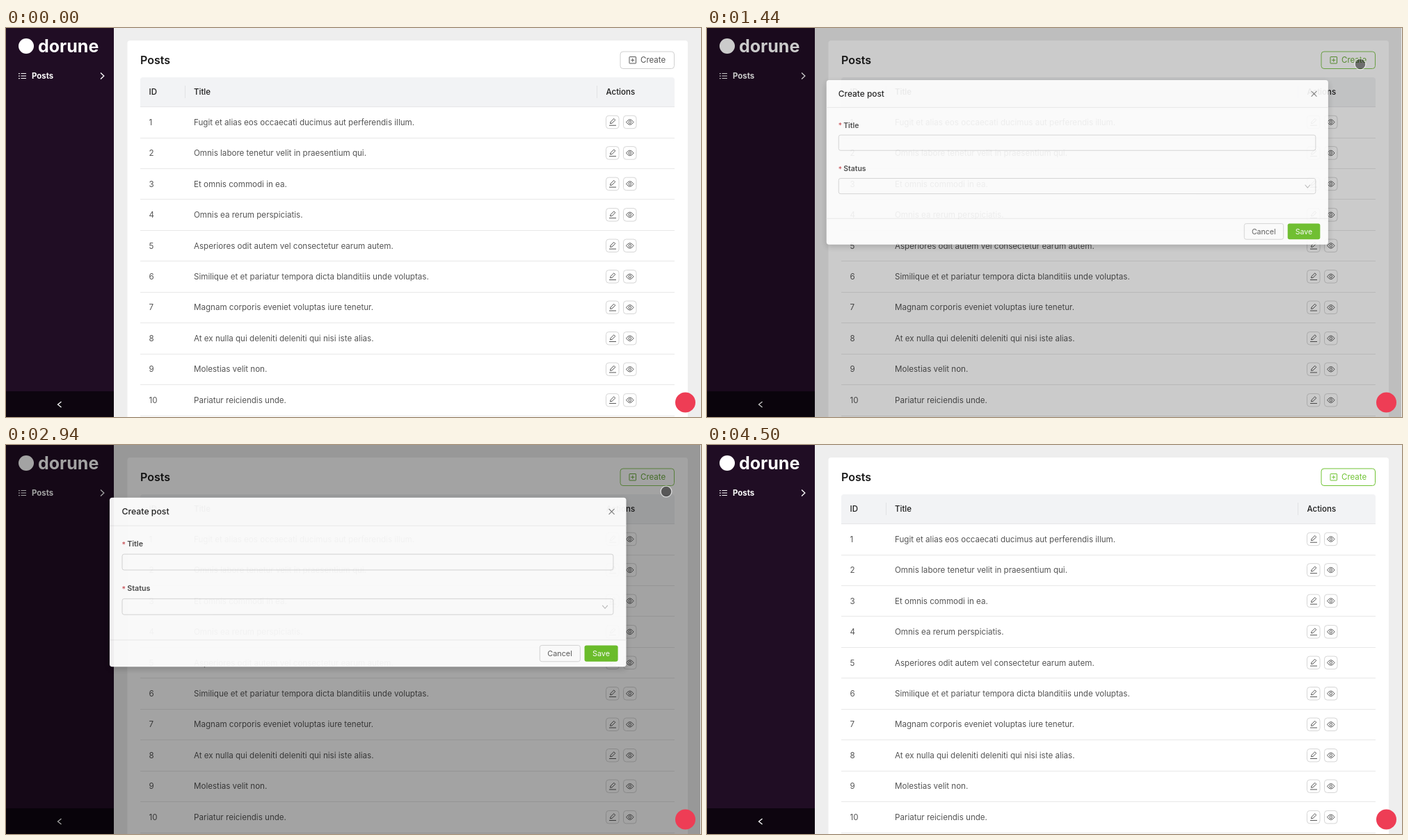
Recreate the animation shown at these times as an HTML page with a canvas. Size 999 by 560 pixels, loop 4.74 s.

```html
<!DOCTYPE html>
<html lang="en">
<head>
<meta charset="utf-8">
<title>Posts</title>
<style>
  html, body { margin: 0; width: 100%; height: 100%; overflow: hidden; background: #eee; }
  canvas { display: block; }
</style>
</head>
<body>
<canvas id="stage" width="999" height="560"></canvas>
<script>
const W = 999, H = 560, LOOP = 4740, STEP = 60;
const GREEN = '#67be23';
const stage = document.getElementById('stage').getContext('2d');
const layer = document.createElement('canvas');
layer.width = W;
layer.height = H;
const layerCtx = layer.getContext('2d');
let ctx = stage;

const POSTS = [
  'Fugit et alias eos occaecati ducimus aut perferendis illum.',
  'Omnis labore tenetur velit in praesentium qui.',
  'Et omnis commodi in ea.',
  'Omnis ea rerum perspiciatis.',
  'Asperiores odit autem vel consectetur earum autem.',
  'Similique et et pariatur tempora dicta blanditiis unde voluptas.',
  'Magnam corporis eveniet voluptas iure tenetur.',
  'At ex nulla qui deleniti deleniti qui nisi iste alias.',
  'Molestias velit non.',
  'Pariatur reiciendis unde.'
];

// Pointer path: time, x, y
const PATH = [
  [600, 955, 80], [780, 948, 62], [1080, 939, 52], [1680, 939, 52],
  [2220, 944, 62], [2700, 949, 67], [2940, 949, 67], [3000, 950, 67],
  [3120, 974, 67], [3240, 1010, 67]
];

const clamp = v => Math.max(0, Math.min(1, v));
const ramp = (t, start, length) => clamp((t - start) / length);
const mix = (a, b, k) => a + (b - a) * k;
const mixRgb = (a, b, k) => `rgb(${a.map((v, i) => Math.round(mix(v, b[i], k))).join(',')})`;

function bezier(x1, y1, x2, y2) {
  const at = (s, a, b) => 3 * (1 - s) ** 2 * s * a + 3 * (1 - s) * s * s * b + s ** 3;
  return x => {
    let lo = 0, hi = 1;
    for (let i = 0; i < 24; i++) {
      const mid = (lo + hi) / 2;
      if (at(mid, x1, x2) < x) lo = mid; else hi = mid;
    }
    return at(lo, y1, y2);
  };
}
const easeOpen = bezier(.08, .82, .17, 1);
const easeClose = bezier(.78, .14, .15, .86);

function text(str, x, y, size, color, weight = 400) {
  ctx.font = `${weight} ${size}px Inter, sans-serif`;
  ctx.fillStyle = color;
  ctx.fillText(str, x, y + size * .36);
}

function box(x, y, w, h, r, fill, stroke) {
  ctx.beginPath();
  ctx.roundRect(x, y, w, h, r);
  if (fill) { ctx.fillStyle = fill; ctx.fill(); }
  if (stroke) { ctx.strokeStyle = stroke; ctx.lineWidth = 1; ctx.stroke(); }
}

function rect(x, y, w, h, color) {
  ctx.fillStyle = color;
  ctx.fillRect(x, y, w, h);
}

function disc(x, y, r, color) {
  ctx.beginPath();
  ctx.arc(x, y, r, 0, Math.PI * 2);
  ctx.fillStyle = color;
  ctx.fill();
}

function line(points, color, width = 1, close = false) {
  ctx.beginPath();
  points.forEach(([x, y]) => ctx.lineTo(x, y));
  if (close) ctx.closePath();
  ctx.strokeStyle = color;
  ctx.lineWidth = width;
  ctx.stroke();
}

function pencil(x, y, color) {
  line([[x - 3.5, y + 2], [x - 3, y - .3], [x + 1.8, y - 5], [x + 3.8, y - 3], [x - 1, y + 1.6]], color, 1, true);
  line([[x - 5, y + 4.7], [x + 5, y + 4.7]], color);
}

function eye(x, y, color) {
  ctx.beginPath();
  ctx.moveTo(x - 5.2, y);
  ctx.quadraticCurveTo(x, y - 7.6, x + 5.2, y);
  ctx.quadraticCurveTo(x, y + 7.6, x - 5.2, y);
  ctx.moveTo(x + 1.8, y);
  ctx.arc(x, y, 1.8, 0, Math.PI * 2);
  ctx.strokeStyle = color;
  ctx.lineWidth = 1;
  ctx.stroke();
}

function sidebar() {
  rect(0, 0, 155, H, '#200d24');
  rect(0, 523, 155, 37, '#0d050f');
  disc(29, 26, 11, '#fff');
  text('dorune', 46, 26, 25, '#fff', 700);
  for (let y = 65.5; y < 74; y += 3.5) {
    rect(18, y - .5, 1.8, 1.2, '#fff');
    rect(21.5, y - .5, 7.5, 1, '#fff');
  }
  text('Posts', 37, 69, 11.4, '#fff', 700);
  line([[136, 64.5], [140.8, 69], [136, 73.5]], '#fff', 1.3);
  line([[79.5, 538], [74.5, 542], [79.5, 546]], '#fff', 1.3);
}

function createButton(glow) {
  const color = mixRgb([85, 85, 85], [112, 195, 52], glow);
  box(883, 34, 77.5, 24.5, 4, '#fff', mixRgb([208, 208, 208], [112, 195, 52], glow));
  box(896, 41.5, 9.5, 9.5, .5, null, color);
  line([[898.2, 46.25], [903.3, 46.25]], color);
  line([[900.75, 43.7], [900.75, 48.8]], color);
  text('Create', 912, 46, 11.5, color);
}

function table() {
  box(193, 71, 768, 42.5, [4, 4, 0, 0], '#f2f3f5');
  rect(193, 113, 768, 1, '#e6e6e8');
  rect(257, 83, 1, 18, '#e1e2e5');
  rect(849, 83, 1, 18, '#e1e2e5');
  [['ID', 205.5], ['Title', 270], ['Actions', 862.5]].forEach(([label, x]) => text(label, x, 92, 11.5, '#1c1c1c', 500));
  POSTS.forEach((title, i) => {
    const y = 135.5 + i * 44.47;
    text(i + 1, 205.5, y, 11.6, '#555');
    text(title, 270, y, 11.6, '#555');
    box(862.5, y - 9.3, 18.5, 18.5, 4, '#fff', '#d6d6d6');
    box(887.5, y - 9.3, 18.5, 18.5, 4, '#fff', '#d6d6d6');
    pencil(872, y, '#555');
    eye(896.8, y, '#555');
    rect(193, Math.round(y + 22), 768, 1, '#e8e8e8');
  });
}

function page(glow) {
  rect(0, 0, W, H, '#eee');
  box(174.5, 18, 805.5, 560, 4, '#fff');
  sidebar();
  text('Posts', 193, 46, 16, '#1c1c1c', 600);
  createButton(glow);
  table();
}

function field(label, y) {
  text('*', 127, y + 1, 11.4, '#c8434a');
  text(label, 135, y, 11.3, '#444', 600);
  box(127.5, y + 15.5, 742, 24, 3, '#fff', '#d4d4d4');
}

function dialog() {
  ctx.shadowColor = 'rgba(0,0,0,.2)';
  ctx.shadowBlur = 10;
  ctx.shadowOffsetY = 3;
  box(108.5, 77, 780.5, 256, 4, '#fff');
  ctx.shadowColor = 'transparent';
  text('Create post', 127, 98, 12.9, '#1c1c1c', 500);
  line([[862.8, 94], [871.2, 102.4]], '#777', 1.1);
  line([[871.2, 94], [862.8, 102.4]], '#777', 1.1);
  rect(108.5, 119, 780.5, 1, '#ebebeb');
  field('Title', 147);
  field('Status', 214.5);
  line([[853, 240], [857, 244.6], [861, 240]], '#b5b5b5', 1.1);
  rect(108.5, 292, 780.5, 1, '#ebebeb');
  box(758.5, 300.5, 61, 24.5, 3, '#fff', '#d4d4d4');
  text('Cancel', 770, 313, 11.4, '#555');
  box(826, 300.5, 50.5, 24.5, 3, GREEN);
  text('Save', 838, 313, 11.4, '#fff');
}

// Draws the dialog as one group, zoomed around the clicked point
function zoomedDialog(shown) {
  const scale = mix(.2, 1, shown), ox = 940, oy = 52;
  layerCtx.setTransform(1, 0, 0, 1, 0, 0);
  layerCtx.clearRect(0, 0, W, H);
  layerCtx.setTransform(scale, 0, 0, scale, ox * (1 - scale), oy * (1 - scale));
  ctx = layerCtx;
  dialog();
  ctx = stage;
  ctx.globalAlpha = shown;
  ctx.drawImage(layer, 0, 0);
  ctx.globalAlpha = 1;
}

function pointer(t) {
  const i = PATH.findIndex(p => p[0] > t);
  if (i < 1) return;
  const [t0, x0, y0] = PATH[i - 1], [t1, x1, y1] = PATH[i];
  const k = (t - t0) / (t1 - t0);
  const x = mix(x0, x1, k), y = mix(y0, y1, k);
  disc(x, y, 7.5, 'rgba(0,0,0,.46)');
  ctx.beginPath();
  ctx.arc(x, y, 7.9, 0, Math.PI * 2);
  ctx.strokeStyle = 'rgba(255,255,255,.65)';
  ctx.lineWidth = 1.3;
  ctx.stroke();
}

function draw(t) {
  const glow = t < 2880 ? ramp(t, 1200, 300)
    : t < 3120 ? 1 - ramp(t, 2880, 240)
    : ramp(t, 3120, 300);
  const shown = t < 2900 ? easeOpen(ramp(t, 1370, 200)) : 1 - easeClose(ramp(t, 2900, 200));
  const shade = .45 * (t < 2900 ? ramp(t, 1350, 200) : 1 - ramp(t, 2900, 200));

  page(glow);
  if (shade > 0) rect(0, 0, W - 1, H, `rgba(0,0,0,${shade})`);
  if (shown > .001) zoomedDialog(shown);
  disc(976.5, 539, 14.5, '#ee3d55');
  pointer(t);
}

const start = performance.now();
function tick() {
  const t = (performance.now() - start) % LOOP;
  draw(Math.floor(t / STEP) * STEP);
  requestAnimationFrame(tick);
}
tick();
</script>
</body>
</html>
```
